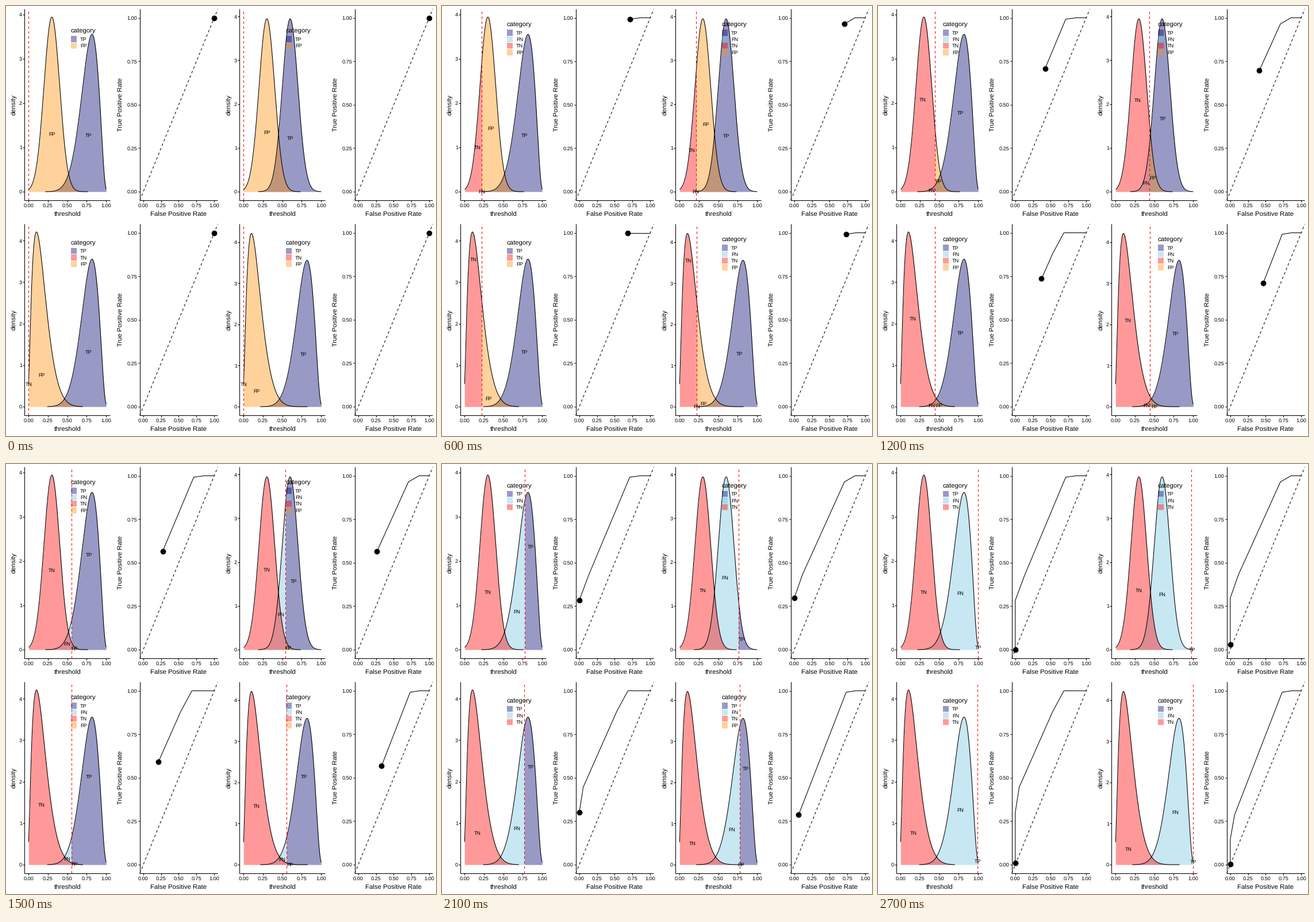
A matplotlib script for the animation above (3 s loop, 748x748 px).

```python
import math
import numpy as np
import matplotlib.pyplot as plt
from matplotlib.animation import FuncAnimation
from matplotlib.patches import Rectangle

SIZE, DPI, STEPS = 748, 88, 10
PT = 72 / DPI
TOP, BOTTOM = 5.4, 338.2              # panel edges
BASE, HEIGHT = 323, 302.5             # zero line and data height
LINE = 1.067 * PT
DASH = (0, (4, 4))
TITLE, SMALL, TAG = 11.4, 9.2, 8.9    # text sizes in pixels
ALPHA, BANDWIDTH = 0.4, 0.0147
COLORS = {"TP": (0, 0, 0.43), "FN": (0.45, 0.77, 0.885),
          "TN": (1, 0, 0), "FP": (1, 0.56, 0.02)}
QUARTERS = [0, 0.25, 0.5, 0.75, 1]

plt.rcParams["font.family"] = "Liberation Sans"
plt.rcParams["text.hinting"] = "no_hinting"
fig = plt.figure(figsize=(SIZE / DPI, SIZE / DPI), dpi=DPI, facecolor="white")
ax = fig.add_axes([0, 0, 1, 1])


def normal(mean, sd=0.1):
    return lambda x: (np.exp(-((x - mean) / sd) ** 2 / 2)
                      / (sd * math.sqrt(2 * math.pi)))


def beta(a, b):
    scale = math.gamma(a + b) / (math.gamma(a) * math.gamma(b))

    def pdf(x):
        inside = np.clip(x, 0, 1)
        return scale * inside ** (a - 1) * (1 - inside) ** (b - 1)
    return pdf


class Scores:
    """Smoothed density of one class of scores between lo and hi."""

    def __init__(self, pdf, lo, hi, level=np.mean):
        self.lo, self.hi, self.level = lo, hi, level
        offsets = np.linspace(-4, 4, 81)
        weights = np.exp(-offsets ** 2 / 2)
        weights /= weights.sum()
        self.density = lambda x: pdf(
            np.asarray(x)[..., None] + BANDWIDTH * offsets) @ weights

    def part(self, lo, hi):
        """Outline between two thresholds, None where there are no scores."""
        lo, hi = max(lo, self.lo), min(hi, self.hi)
        if lo > hi:
            return None
        x = np.linspace(lo, hi, 400)
        return x, self.density(x)

    def rate(self, cut):
        return np.clip((self.hi - cut) / (self.hi - self.lo), 0, 1)


class Panel:
    def __init__(self, origin, peak, last_cut, negative, positive):
        self.ox, self.oy = origin
        self.peak = peak
        self.cuts = np.linspace(0, last_cut, STEPS)
        self.negative, self.positive = negative, positive

    def line(self, x, y, color="black", **style):
        ax.plot(np.asarray(x) + self.ox, np.asarray(y) + self.oy, color=color,
                lw=LINE, solid_capstyle="butt", dash_capstyle="butt", **style)

    def text(self, x, y, label, size, ha="center"):
        ax.text(x + self.ox, y + self.oy + 0.36 * size, label,
                fontsize=size * PT, ha=ha, va="baseline")

    def axes(self, left, right, xs, ys, xlabel, ylabel, ylabel_x):
        """xs and ys are (position, label) pairs."""
        self.line([left, left, right], [TOP, BOTTOM, BOTTOM])
        for x, label in xs:
            self.line([x, x], [BOTTOM, BOTTOM + 3])
            self.text(x, 346.6, label, SMALL)
        for y, label in ys:
            self.line([left - 3, left], [y, y])
            self.text(left - 4.5, y, label, SMALL, ha="right")
        self.text((left + right) / 2, 361.5, xlabel, TITLE)
        ax.text(ylabel_x + self.ox, (TOP + BOTTOM) / 2 + self.oy, ylabel,
                fontsize=TITLE * PT, rotation=90, ha="center", va="center")

    def legend(self, names):
        title_y = 53.2 - 5.6 * len(names)
        self.text(112.2, title_y, "category", TITLE, ha="left")
        for i, name in enumerate(names):
            y = title_y + 15.5 + 11.4 * i
            ax.add_patch(Rectangle((113 + self.ox, y - 5.2 + self.oy), 10.4, 10.4,
                                   fc=COLORS[name], alpha=ALPHA, lw=0, zorder=3))
            self.text(129, y, name, SMALL, ha="left")

    def draw_density(self, step):
        cut = self.cuts[step]

        def to_px(t, d):
            return 39.25 + 135 * t, BASE - HEIGHT / self.peak * d

        parts = {"TP": (self.positive, cut, 1), "FN": (self.positive, 0, cut),
                 "TN": (self.negative, 0, cut), "FP": (self.negative, cut, 1)}
        present = []
        for name, (scores, lo, hi) in parts.items():
            outline = scores.part(lo, hi)
            if outline is None:
                continue
            present.append(name)
            x, y = to_px(*outline)
            ax.fill_between(x + self.ox, y + self.oy, BASE + self.oy,
                            color=COLORS[name], alpha=ALPHA, lw=0)
            t, d = outline
            self.text(*to_px(np.average(t, weights=d), scores.level(d)), name, TAG)

        for scores in (self.positive, self.negative):
            self.line(*to_px(*scores.part(0, 1)))
        self.line([to_px(cut, 0)[0]] * 2, [BOTTOM, TOP], color="red", ls=DASH)
        self.axes(32.5, 181, [(to_px(t, 0)[0], f"{t:.2f}") for t in QUARTERS],
                  [(to_px(0, v)[1], str(v)) for v in range(5)],
                  "threshold", "density", 14)
        self.legend(present)

    def draw_roc(self, step):
        def to_px(fpr, tpr):
            return 238.8 + 123.4 * fpr, BASE - HEIGHT * tpr

        ends = np.array([-0.05, 1.05])
        self.line(*to_px(ends, ends), ls=DASH)
        cuts = self.cuts[:step + 1]
        x, y = to_px(self.negative.rate(cuts), self.positive.rate(cuts))
        self.line(x, y)
        ax.plot(x[-1] + self.ox, y[-1] + self.oy, "o", color="black",
                ms=9.8 * PT, mew=0)
        self.axes(232.6, 368.4, [(to_px(t, 0)[0], f"{t:.2f}") for t in QUARTERS],
                  [(to_px(0, t)[1], f"{t:.2f}") for t in QUARTERS],
                  "False Positive Rate", "True Positive Rate", 200)


panels = [
    Panel((0, 0), 3.93, 1.0, Scores(normal(0.3), 0.002, 0.765),
          Scores(beta(10, 3), 0.216, 1)),
    Panel((374, 0), 3.97, 0.975, Scores(normal(0.3), 0.002, 0.734),
          Scores(normal(0.6), 0.188, 1)),
    Panel((0, 374), 4.19, 0.992, Scores(beta(2, 10), 0, 0.70, np.median),
          Scores(beta(10, 3), 0.24, 1)),
    Panel((374, 374), 4.225, 0.997, Scores(beta(2, 10), 0, 0.825, np.median),
          Scores(beta(10, 3), 0.215, 1)),
]


def draw(step):
    ax.clear()
    ax.set(xlim=(0, SIZE), ylim=(SIZE, 0))
    ax.axis("off")
    for panel in panels:
        panel.draw_density(step)
        panel.draw_roc(step)
    return []


anim = FuncAnimation(fig, draw, frames=STEPS, interval=300, init_func=lambda: [],
                     repeat=True, repeat_delay=0)
plt.show()
```
